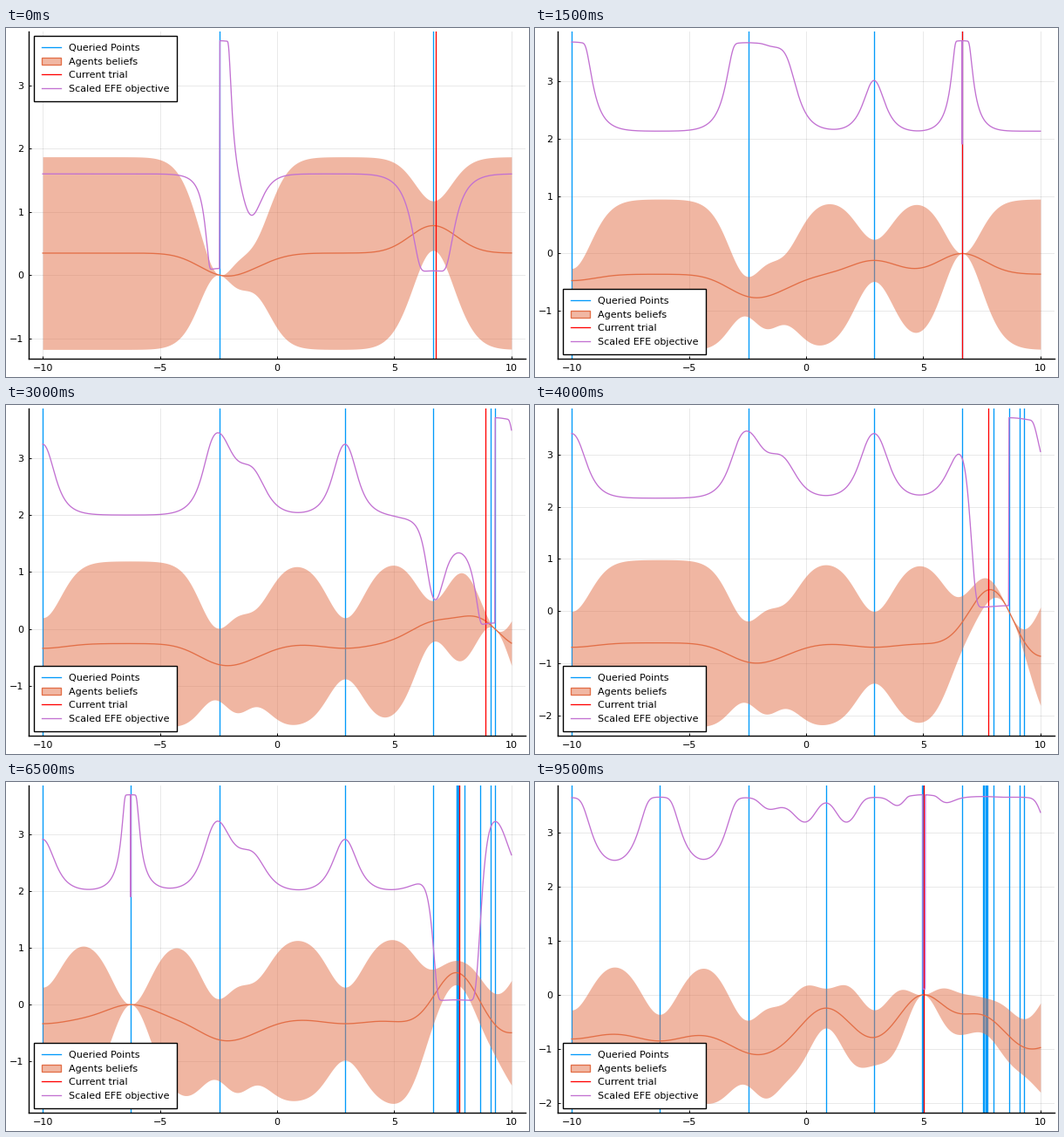
Write a matplotlib script that moves like this. It is 600 px wide and 400 px high and loops after 10000 ms.

```python
import math
import numpy as np
import matplotlib.pyplot as plt
from matplotlib.animation import FuncAnimation
from matplotlib.patches import Rectangle

plt.rcParams["font.family"] = "DejaVu Sans"
BLUE, ORANGE, RED, PURPLE = "#009afa", "#e36f47", "#ff0000", "#c271d2"
N_FRAMES, INTERVAL = 20, 500
LINE = 0.95
NOISE = 0.5
OPTIMUM = 5

# Points queried in turn: coarse search, descent, fine search, jump to the optimum.
POINTS = np.array([-1.15, -2.45, 6.66, -10, 6.66, 2.9, 6.66]
                  + [9.3, 9.1, 8.65, 7.98, 7.75, 7.67, 7.7]
                  + [-6.25, 7.68, 7.66, 7.56, 7.6]
                  + [4.94, 4.98, 0.85])
# A point is preferred over the one before it when it lies closer to the optimum.
WINS = (np.diff(np.abs(POINTS - OPTIMUM)) < 0).astype(float)
GRID = np.linspace(-10, 10, 2001)
erf = np.vectorize(math.erf)


def kernel(a, b):
    return np.exp(-0.5 * np.subtract.outer(a, b) ** 2)


def beliefs(n):
    """Mean and variance of the utility gain over the reference point."""
    pts, ref = POINTS[:n + 3], POINTS[n + 1]
    diff = np.diff(np.eye(len(pts)), axis=0)
    cov = diff @ kernel(pts, pts) @ diff.T + NOISE * np.eye(len(diff))
    gain = (kernel(GRID, pts) - kernel(ref, pts)) @ diff.T
    solved = np.linalg.solve(cov, gain.T).T
    mean = solved @ WINS[:len(diff)]
    var = 2 - 2 * kernel(GRID, ref) - (solved * gain).sum(axis=1)
    return mean, np.maximum(var, 0)


def objective(mean, var):
    center = 1.8 + 0.105 * np.exp(-var / 0.9)
    return center - 1.8 * erf(0.72 * mean / np.maximum(var ** 2, 1e-9))


def best_trial(goal):
    """A point a little right of the middle of the near-minimal region."""
    return np.percentile(GRID[goal < goal.min() + 0.015], 60)


fig = plt.figure(figsize=(6, 4), dpi=100, facecolor="white")
ax = fig.add_axes([26 / 600, 21 / 400, 570 / 600, 375 / 400])
overlay = fig.add_axes([0, 0, 1, 1])


def draw_legend(top):
    overlay.clear()
    overlay.set(xlim=(0, 600), ylim=(400, 0))
    overlay.axis("off")
    overlay.add_patch(Rectangle((32, top), 164, 75, fc="white", ec="black", lw=1))
    rows = [("Queried Points", BLUE), ("Agents beliefs", ORANGE),
            ("Current trial", RED), ("Scaled EFE objective", PURPLE)]
    for i, (label, color) in enumerate(rows):
        y = top + 13.2 + 15.6 * i
        if color == ORANGE:
            overlay.add_patch(Rectangle((41, y - 4), 22, 8, fc="#f1b7a3", ec=ORANGE, lw=LINE))
        else:
            overlay.plot([41, 63], [y, y], color=color, lw=LINE)
        overlay.text(72, y + 4, label, fontsize=8, va="baseline")


def style_axes(low, high):
    pad = 0.03 * (high - low)
    ax.set(xlim=(-10.6, 10.6), ylim=(low - pad, high + pad))
    ax.set_xticks([-10, -5, 0, 5, 10])
    ax.set_yticks(range(math.ceil(low - pad), math.floor(high + pad) + 1))
    ax.tick_params(direction="in", length=2.5, width=0.7, labelsize=8, pad=4)
    ax.grid(color="black", alpha=0.1, lw=0.6)
    ax.set_axisbelow(True)
    ax.patch.set_alpha(0)
    for side in ("top", "right"):
        ax.spines[side].set_visible(False)
    for side in ("left", "bottom"):
        ax.spines[side].set_linewidth(1)


def update(n):
    ax.clear()
    mean, var = beliefs(n)
    goal = objective(mean, var)
    for x in np.unique(POINTS[1:n + 3]):
        ax.axvline(x, color=BLUE, lw=LINE, zorder=2)
    ax.fill_between(GRID, mean - var, mean + var, color=ORANGE, alpha=0.5, lw=0, zorder=3)
    ax.plot(GRID, mean, color=ORANGE, lw=LINE, zorder=4)
    ax.axvline(best_trial(goal), color=RED, lw=LINE, zorder=5)
    ax.plot(GRID, goal, color=PURPLE, lw=LINE, zorder=6)
    style_axes((mean - var).min(), max(goal.max(), (mean + var).max()))
    draw_legend(9 if goal[GRID < -4].mean() < 1.9 else 299)
    return []


anim = FuncAnimation(fig, update, frames=N_FRAMES, interval=INTERVAL,
                     repeat=True, repeat_delay=0, blit=False)
plt.show()
```
